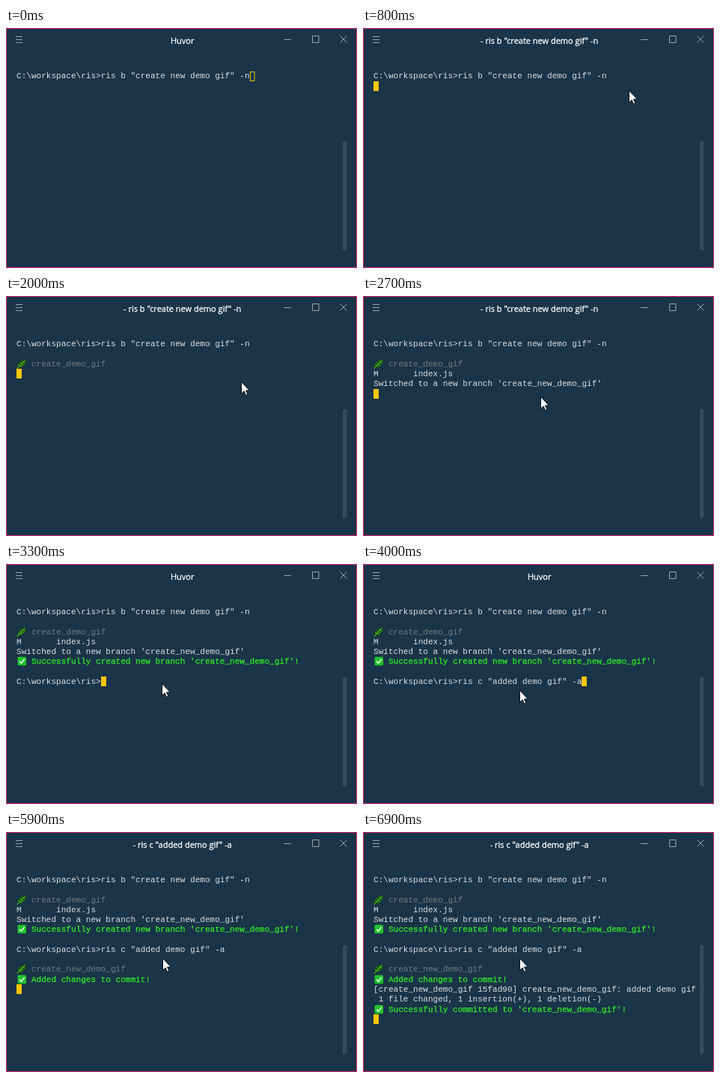
Recreate the animation shown at these times as an HTML page. Size 469 by 320 pixels, loop 7 s.

```html
<!DOCTYPE html>
<html lang="en">
<head>
<meta charset="utf-8">
<title>Terminal demo</title>
<style>
  html, body { margin: 0; width: 100%; height: 100%; overflow: hidden; background: #1a3449; }
  svg { display: block; width: 469px; height: 320px; }
  text { white-space: pre; }
  .title { font: 11px "Open Sans", "Noto Sans", sans-serif; fill: #fff; stroke: #fff; stroke-width: .3; text-anchor: middle; }
  .line { font: 11.05px "Liberation Mono", "Courier New", monospace; fill: #dbe0e3; }
  .dim { fill: #737b80; }
  .ok { fill: #30f026; stroke: #30f026; stroke-width: .25; }
  .icon { fill: none; stroke: #98a6b0; stroke-width: 1; }
</style>
</head>
<body>
<svg viewBox="0 0 469 320" xmlns="http://www.w3.org/2000/svg">
  <defs>
    <g id="leaf">
      <path d="M2.5 10.500 1.500 6.500 4 7 3.500 3.500 6 5 6.500 1.500 8.500 2.500 12.500 .5 11.500 4.500 12.500 6.500 9 7 10 9.500 6.500 9 6.500 11.500Z" fill="#123a10" stroke="#123a10" stroke-linejoin="round"/>
      <path d="M1 12.500 11.500 1.500M4.500 9 2.500 7.500M6.500 7 4.500 4.500M8.500 5 7.500 2.500M5 9 7.500 10M7 7 9.500 8M9 4.500 11.500 5.500" stroke="#46ad22" stroke-width="1.200" stroke-linecap="round" fill="none"/>
    </g>
    <g id="tick">
      <rect x="1.500" y=".8" width="11.500" height="11.500" rx="1.500" fill="#1fc42c"/>
      <path d="M4 6.800 6.400 9.200 10.700 3.900" stroke="#fff" stroke-width="1.500" fill="none"/>
    </g>
  </defs>

  <rect width="469" height="320" fill="#1a3449"/>
  <rect x=".5" y=".5" width="468" height="319" fill="none" stroke="#e0286a"/>
  <path class="icon" d="M13 11.500h9M13 15.500h9M13 19.500h9M371 15.500h10M409.500 10.500h8.500v9h-8.500zM446.500 10.500l9 9M455.500 10.500l-9 9"/>
  <rect x="450" y="151" width="5.500" height="145" rx="1.500" fill="#334b5d"/>

  <text id="title" class="title" x="235.700" y="20.600"></text>
  <g id="lines"></g>
  <rect id="block"/>
  <path id="mouse" d="M.5 .5V16.300L4.100 12.900 6.600 18.400 9 17.300 6.500 12H11.300Z" fill="#fff" stroke="#0b0f14" stroke-linejoin="round"/>
</svg>

<script>
const LOOP = 7000, STEP = 100;
const LEFT = 14, TOP = 56.7, COL = 6.63, ROW = 13.27;
const NS = "http://www.w3.org/2000/svg";
const $ = id => document.getElementById(id);

const APP = "Huvor";
const PROMPT = "C:\\workspace\\ris>";
const BRANCH = 'ris b "create new demo gif" -n';
const COMMIT = 'ris c "added demo gif" -a';

// start time, row, text, style, icon
const lines = [
  [0, 0, PROMPT + BRANCH],
  [1700, 2, "   create_demo_gif", "dim", "leaf"],
  [2700, 3, "M       index.js"],
  [2700, 4, "Switched to a new branch 'create_new_demo_gif'"],
  [2900, 5, "   Successfully created new branch 'create_new_demo_gif'!", "ok", "tick"],
  [3100, 7, PROMPT],
  [3600, 7, " ".repeat(PROMPT.length) + COMMIT],
  [5300, 9, "   create_new_demo_gif", "dim", "leaf"],
  [5900, 10, "   Added changes to commit!", "ok", "tick"],
  [6900, 11, "[create_new_demo_gif 15fad90] create_new_demo_gif: added demo gif"],
  [6900, 12, " 1 file changed, 1 insertion(+), 1 deletion(-)"],
  [6900, 13, "   Successfully committed to 'create_new_demo_gif'!", "ok", "tick"]
];

const titles = [[0, APP], [600, "- " + BRANCH], [3100, APP], [4200, "- " + COMMIT]];

// start time, row, column of the text cursor
const cursors = [
  [0, 0, 47], [600, 1, 0], [1700, 3, 0], [2700, 5, 0], [2900, 6, 0], [3100, 7, 17],
  [3600, 7, 42], [4200, 8, 0], [5300, 10, 0], [5900, 11, 0], [6900, 14, 0]
];
const FOCUS = 300;

// time, x, y of the pointer tip
const path = [
  [100, 440, 300], [400, 384, 170], [700, 355, 83], [1300, 355, 83],
  [2000, 314, 114], [2800, 226, 137], [3300, 208, 159], [3700, 209, 168], [LOOP, 209, 168]
];

function add(tag, attrs, parent) {
  const el = document.createElementNS(NS, tag);
  set(el, attrs);
  return parent.appendChild(el);
}

function set(el, attrs) {
  for (const key in attrs) el.setAttribute(key, attrs[key]);
}

const latest = (table, t) => table.filter(row => row[0] <= t).pop();

const groups = lines.map(([start, row, text, style = "", icon]) => {
  const g = add("g", {}, $("lines"));
  const y = TOP + row * ROW;
  const indent = text.length - text.trimStart().length;
  if (icon) add("use", { href: "#" + icon, x: LEFT, y: Math.round(y + .3) }, g);
  add("text", { class: "line " + style, x: LEFT + indent * COL, y: y + 10.3 }, g)
    .textContent = text.trimStart();
  return { g, start };
});

function pointer(t) {
  const i = path.findIndex(p => p[0] > t);
  const [t0, x0, y0] = path[i - 1], [t1, x1, y1] = path[i];
  const k = (t - t0) / (t1 - t0);
  return [x0 + (x1 - x0) * k, y0 + (y1 - y0) * k].map(Math.round);
}

function draw(time) {
  const t = Math.floor(time % LOOP / STEP) * STEP;
  for (const { g, start } of groups) g.style.display = t >= start ? "" : "none";
  $("title").textContent = latest(titles, t)[1];

  const [, row, col] = latest(cursors, t);
  const x = Math.round(LEFT + col * COL), y = Math.round(TOP + row * ROW + .8);
  if (t < FOCUS) {
    set($("block"), { x: x + .5, y: y + .5, width: 5.5, height: 12,
      fill: "none", stroke: "#e6c30c" });
  } else {
    set($("block"), { x, y, width: 7, height: 13, fill: "#ffc600", stroke: "none" });
  }

  const shown = t >= path[0][0];
  $("mouse").style.display = shown ? "" : "none";
  if (shown) $("mouse").setAttribute("transform", `translate(${pointer(t)})`);
}

const begin = performance.now();
function tick() {
  draw(performance.now() - begin);
  requestAnimationFrame(tick);
}
tick();
</script>
</body>
</html>
```
